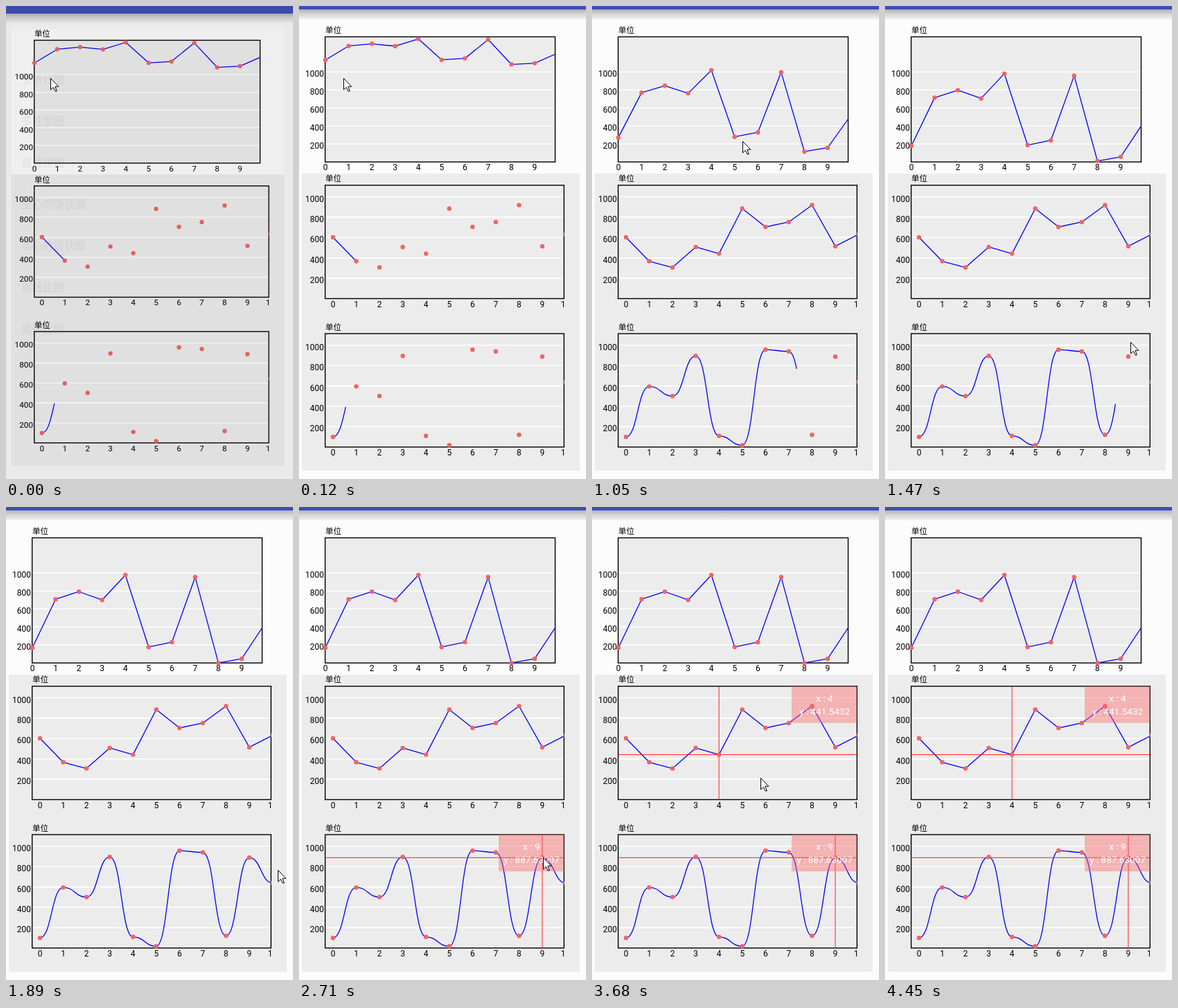
Write an HTML page that moves like this. It is 414 by 683 pixels and loops after 4.9 s.

```html
<!DOCTYPE html>
<html lang="zh">
<head>
<meta charset="utf-8">
<title>Line charts</title>
<style>
html, body { margin: 0; width: 100%; height: 100%; overflow: hidden; background: #fcfcfc; }
svg { display: block; width: 414px; height: 683px; }
text { font: 12px Roboto, Arial, sans-serif; fill: #000; }
.unit { font: 500 11.5px "Noto Sans CJK SC", "Noto Sans CJK", sans-serif; }
.tip { font-size: 13.5px; fill: #fff; text-anchor: middle; }
.ghost text { font: bold 15.5px "Noto Sans CJK SC", "Noto Sans CJK", sans-serif; opacity: .045; }
.line { fill: none; stroke: #00f; stroke-width: 1.3; stroke-linejoin: round; }
.frame { fill: none; stroke: #000; stroke-width: 1.4; }
.cross { stroke: #f22; }
</style>
</head>
<body>
<svg viewBox="0 0 414 683">
  <defs>
    <linearGradient id="shade" x1="0" y1="0" x2="0" y2="1">
      <stop offset="0" stop-color="#b2b2b6"/>
      <stop offset=".4" stop-color="#d2d2d2"/>
      <stop offset="1" stop-color="#f0f0f0"/>
    </linearGradient>
  </defs>
  <rect id="back" width="414" height="683"/>
  <g id="page">
    <rect x="-20" y="-20" width="460" height="25.3" fill="#3f4fb4"/>
    <rect x="-20" y="5.3" width="460" height="13.7" fill="url(#shade)"/>
    <rect x="4" y="28" width="401" height="214" fill="#fcfcfc"/>
    <rect x="4" y="242" width="401" height="429" fill="#ececec"/>
  </g>
  <g id="intro" class="ghost">
    <rect width="414" height="683" opacity=".05"/>
  </g>
  <path id="cursor" d="M.5 .5V17L4.3 13.4 7 19H9.3L6.9 12.3H11.8Z" fill="#fff" stroke="#000" stroke-linejoin="round"/>
</svg>
<script>
const LOOP = 4900, OPEN = 120, RESUME = 240, LEFT = 37.7, STEP = 33.55;
const $ = id => document.getElementById(id);
const page = $('page'), intro = $('intro'), cursor = $('cursor');

// Pointer moves: start, end, x, y
const MOVES = [
  [660, 1050, 216, 194],
  [1050, 1740, 363, 503],
  [1740, 1890, 392, 524],
  [2010, 2280, 353, 507],
  [2710, 3220, 184, 359],
  [3530, 3800, 249, 394],
  [4329, 4330, 396, 674]
];

function add(parent, tag, attrs, text) {
  const el = document.createElementNS('http://www.w3.org/2000/svg', tag);
  for (const k in attrs) el.setAttribute(k, attrs[k]);
  if (text) el.textContent = text;
  return parent.appendChild(el);
}

const show = (el, on) => { el.style.display = on ? '' : 'none'; };
const clamp = v => Math.min(1, Math.max(0, v));

function chart({ id, top, base, right, scale, x0, values }) {
  const g = add(page, 'g', {});
  const box = { x: LEFT, y: top, width: right - LEFT, height: base - top };
  const px = i => x0 + STEP * i, py = v => base - v * scale;
  add(add(g, 'clipPath', { id }), 'rect', { x: 0, y: top, width: right + .5, height: base - top + 20 });
  add(g, 'rect', { ...box, fill: '#ececec' });
  for (let v = 200; v <= 1000; v += 200) {
    add(g, 'path', { d: `M${LEFT} ${py(v)}H${right}`, stroke: '#fff', 'stroke-width': 1.6 });
    add(g, 'text', { x: 36, y: py(v) + 7, 'text-anchor': 'end' }, String(v));
  }
  add(g, 'text', { x: 38, y: top - 5.4, class: 'unit' }, '单位');
  add(g, 'rect', { ...box, class: 'frame' });
  const inner = add(g, 'g', { 'clip-path': `url(#${id})` });
  for (let i = 0; px(i) < right + 3; i++)
    add(inner, 'text', { x: px(i), y: base + 12, 'text-anchor': 'middle' }, String(i));
  const line = add(inner, 'path', { class: 'line' });
  const cross = add(inner, 'g', { class: 'cross' });
  const dots = values.map((v, i) => add(inner, 'circle', { cx: px(i), cy: py(v), r: 3.2, fill: '#ee6565' }));
  return { g, line, cross, dots, values, px, py, top, base, right };
}

// Each smooth piece has level tangents and control points halfway across.
function route(c, smooth) {
  return c.values.map((v, i) => {
    const x = c.px(i), y = c.py(v), mid = x - STEP / 2;
    if (!i) return `M${x} ${y}`;
    return smooth ? `C${mid} ${c.py(c.values[i - 1])} ${mid} ${y} ${x} ${y}` : `L${x} ${y}`;
  }).join('');
}

// The pen waits at a short stub while the page opens, then runs at even speed.
function pen(c, smooth, stub, from, speed) {
  c.line.setAttribute('d', route(c, smooth));
  return t => c.line.setAttribute('stroke-dasharray', `${t < RESUME ? stub : from + speed * t} 3000`);
}

function marker(c, index, value, since) {
  const x = c.px(index), y = c.py(c.values[index]);
  add(c.cross, 'path', { d: `M${x} ${c.top}V${c.base}M${LEFT} ${y}H${c.right}` });
  const tip = add(c.g, 'g', {});
  add(tip, 'rect', { x: 288, y: c.top, width: c.right - 288, height: 53, fill: '#fa6666', opacity: .43 });
  add(tip, 'text', { x: 335.5, y: c.top + 22, class: 'tip' }, 'x : ' + index);
  add(tip, 'text', { x: 335.5, y: c.top + 41.3, class: 'tip' }, 'y : ' + value);
  return t => [c.cross, tip].forEach(el => show(el, t >= since));
}

const falling = chart({ id: 'k1', top: 44.5, base: 225.2, right: 369.5, scale: .13, x0: 38,
  values: [169, 708, 792, 700, 977, 177, 231, 954, 0, 46, 438] });
const straight = chart({ id: 'k2', top: 258.8, base: 422.5, right: 382.3, scale: .147, x0: 49,
  values: [602, 367, 306, 507, 441.5, 884, 704, 752, 918, 514, 631] });
const smooth = chart({ id: 'k3', top: 473.1, base: 636.8, right: 382.3, scale: .147, x0: 49,
  values: [99, 595, 500, 894.5, 109, 17, 956, 939, 119, 887.6, 640] });
falling.g.querySelector('[clip-path]').removeAttribute('clip-path');
falling.line.setAttribute('clip-path', 'url(#k1)');
falling.dots[10].remove();

['多折线图', '多柱型图', '普通饼图', '空心的饼状图', '实心的饼状图', '直线比例', '矩形比例']
  .forEach((s, i) => add(intro, 'text', { x: 22, y: 112 + 60 * i }, s));

// Values settle downwards from above the frame, slowing to a stop.
function settle(t) {
  const left = clamp((1659 - (t < RESUME ? -206 : t)) / 2212), { px, py, values, dots, line } = falling;
  const ys = values.map(v => py(v) + (27 - py(v)) * left * left);
  line.setAttribute('d', 'M' + ys.map((y, i) => `${px(i)} ${y}`).join('L'));
  ys.forEach((y, i) => dots[i].setAttribute('cy', y));
}

function movePointer(t) {
  let x = 64, y = 104;
  for (const [a, b, tx, ty] of MOVES) {
    const f = 1 - (1 - clamp((t - a) / (b - a))) ** 3;
    x += (tx - x) * f;
    y += (ty - y) * f;
  }
  cursor.setAttribute('transform', `translate(${Math.round(x)} ${Math.round(y)})`);
  show(cursor, t < 3800 || (t >= 4330 && t < 4450));
}

function openPage(t) {
  const opening = t < OPEN;
  page.setAttribute('transform', opening ? 'translate(3.7 5.8) scale(.982 .9815)' : '');
  $('back').setAttribute('fill', opening ? '#f7f7f7' : '#fcfcfc');
  show(intro, opening);
}

const parts = [
  openPage, settle, movePointer,
  pen(straight, false, 45, 72, .42),
  pen(smooth, true, 49, 188, .354),
  marker(straight, 4, '441.5432', 3530),
  marker(smooth, 9, '887.63007', 2710)
];

const start = performance.now();
function frame() {
  const t = (performance.now() - start) % LOOP;
  parts.forEach(part => part(t));
  requestAnimationFrame(frame);
}
frame();
</script>
</body>
</html>
```
